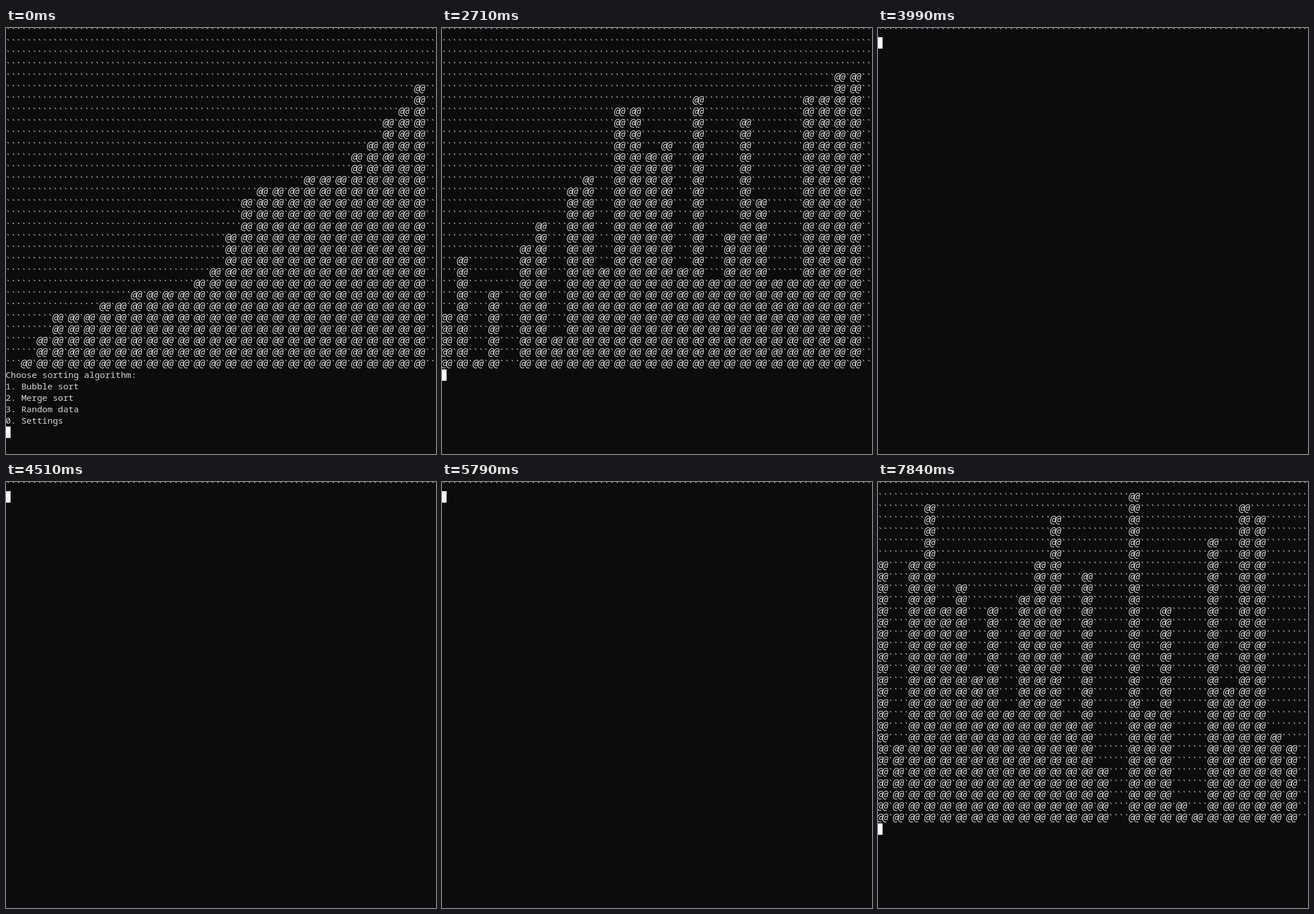
Write an HTML page with a canvas that moves like this. It is 752 px wide and 745 px high and loops after 8 s.

```html
<!DOCTYPE html>
<html lang="en">
<head>
<meta charset="utf-8">
<title>Sorting in the terminal</title>
<style>
  html, body { margin: 0; width: 100%; height: 100%; overflow: hidden; background: #0c0c0c; }
  canvas { display: block; }
</style>
</head>
<body>
<canvas id="screen" width="752" height="745"></canvas>
<script>
const ctx = document.getElementById("screen").getContext("2d");
const LOOP = 8000, COLS = 82, ROWS = 30, BARS = 27;
const CELL_W = 9.17, CELL_H = 20.03, LEFT = -0.8, TOP = -4, BASELINE = 15;
const TEXT_FONT = '15.28px "Noto Sans Mono", "DejaVu Sans Mono", monospace';
const BAR_FONT = 'italic 17px "DejaVu Sans Mono", monospace';
const MENU = ["Choose sorting algorithm:", "1. Bubble sort", "2. Merge sort", "3. Random data", "0. Settings"];
const INPUT_ROW = ROWS + MENU.length;

// Sorting: the first pass, the time per pass, and how long a cleared screen stays
const FIRST_PASS = 1940, PASS = 256.9, PASSES = 19, FLASH = 30;
const flashes = pass => pass === 4 || (pass >= 8 && pass < PASSES - 1);

// Bar heights of the three charts; the sorted one rises through a few key points
const sorted = heights([[0, 0], [3, 5], [8, 7], [11, 7.8], [13, 9.9], [15, 15.9], [19, 17], [21, 17.7], [26, 25]]);
const shuffled = [5, 10, 11, 13, 16, 17, 1, 7, 0, 23, 23, 3, 24, 24, 9, 24, 26, 19, 20, 9, 26, 8, 12, 22, 15, 8, 8];
const reshuffled = [23, 7, 23, 28, 19, 21, 13, 19, 10, 20, 23, 27, 9, 22, 5, 0, 29, 10, 19, 2, 1, 25, 12, 28, 27, 8, 7];

function heights(points) {
  return Array.from({ length: BARS }, (_, i) => {
    const k = Math.max(1, points.findIndex(([x]) => x >= i));
    const [x0, y0] = points[k - 1], [x1, y1] = points[k];
    return Math.floor(y0 + (y1 - y0) * (i - x0) / (x1 - x0));
  });
}

function bubbleSort(list, passes) {
  const a = [...list];
  for (let p = 0; p < passes; p++)
    for (let i = 0; i + 1 < a.length; i++)
      if (a[i] > a[i + 1]) [a[i], a[i + 1]] = [a[i + 1], a[i]];
  return a;
}

// The prompt: the menu, the typed key and the cursor as [column, row]
const prompt = (bars, typed, cursor) => ({ bars, typed, cursor, menu: true });
const chart = bars => ({ bars, cursor: [0, ROWS] });
const cleared = { bars: null, cursor: [0, 1] };

function stateAt(t) {
  if (t < 180) return prompt(sorted, "", [0, INPUT_ROW]);
  if (t < 580) return prompt(sorted, "", null);
  if (t < 710) return prompt(sorted, "1", null);
  if (t < 1220) return prompt(sorted, "1", [1, INPUT_ROW]);
  if (t < 1420) return prompt(sorted, "1", null);
  if (t < 1450) return prompt(sorted, "1", [0, INPUT_ROW + 1]);
  if (t < 6820) return sortingAt(t);
  const done = bubbleSort(shuffled, PASSES);
  if (t < 6850) return prompt(done, "", null);
  if (t < 7480) return prompt(done, "", [0, INPUT_ROW]);
  if (t < 7810) return prompt(done, "1", [1, INPUT_ROW]);
  if (t < 7840) return prompt(done, "1", [0, INPUT_ROW + 1]);
  return chart(reshuffled);
}

function sortingAt(t) {
  if (t < FIRST_PASS) return chart(shuffled);
  const start = i => Math.floor((FIRST_PASS + i * PASS) / 10) * 10;
  let pass = 0;
  while (pass < PASSES - 1 && start(pass + 1) <= t) pass++;
  if (flashes(pass) && t < start(pass) + FLASH) return cleared;
  return chart(bubbleSort(shuffled, pass + 1));
}

const cellX = col => LEFT + col * CELL_W;
const cellY = row => TOP + row * CELL_H;

function write(text, col, row, font = TEXT_FONT) {
  ctx.font = font;
  ctx.fillText(text, cellX(col), cellY(row) + BASELINE);
}

function drawChart(bars) {
  ctx.textAlign = "center";
  for (let row = 0; row < (bars ? ROWS : 1); row++) {
    for (let col = 0; col < COLS; col++) {
      const filled = bars && col % 3 < 2 && bars[Math.floor(col / 3)] >= ROWS - row;
      if (filled) write("@", col + 0.5, row, BAR_FONT);
      else write("`", col + 0.5, row);
    }
  }
  ctx.textAlign = "left";
}

function draw({ bars, cursor, menu, typed }) {
  ctx.fillStyle = "#0c0c0c";
  ctx.fillRect(0, 0, 752, 745);
  ctx.fillStyle = "#d4d4d4";
  drawChart(bars);
  if (menu) {
    MENU.forEach((line, i) => write(line, 0, ROWS + i));
    write(typed, 0, INPUT_ROW);
  }
  if (cursor) {
    const [col, row] = cursor;
    ctx.fillStyle = "#f8f8f8";
    ctx.fillRect(Math.round(col * CELL_W), Math.round(cellY(row)), 8, 20);
  }
}

function tick() {
  draw(stateAt(performance.now() % LOOP));
  requestAnimationFrame(tick);
}
tick();
</script>
</body>
</html>
```
